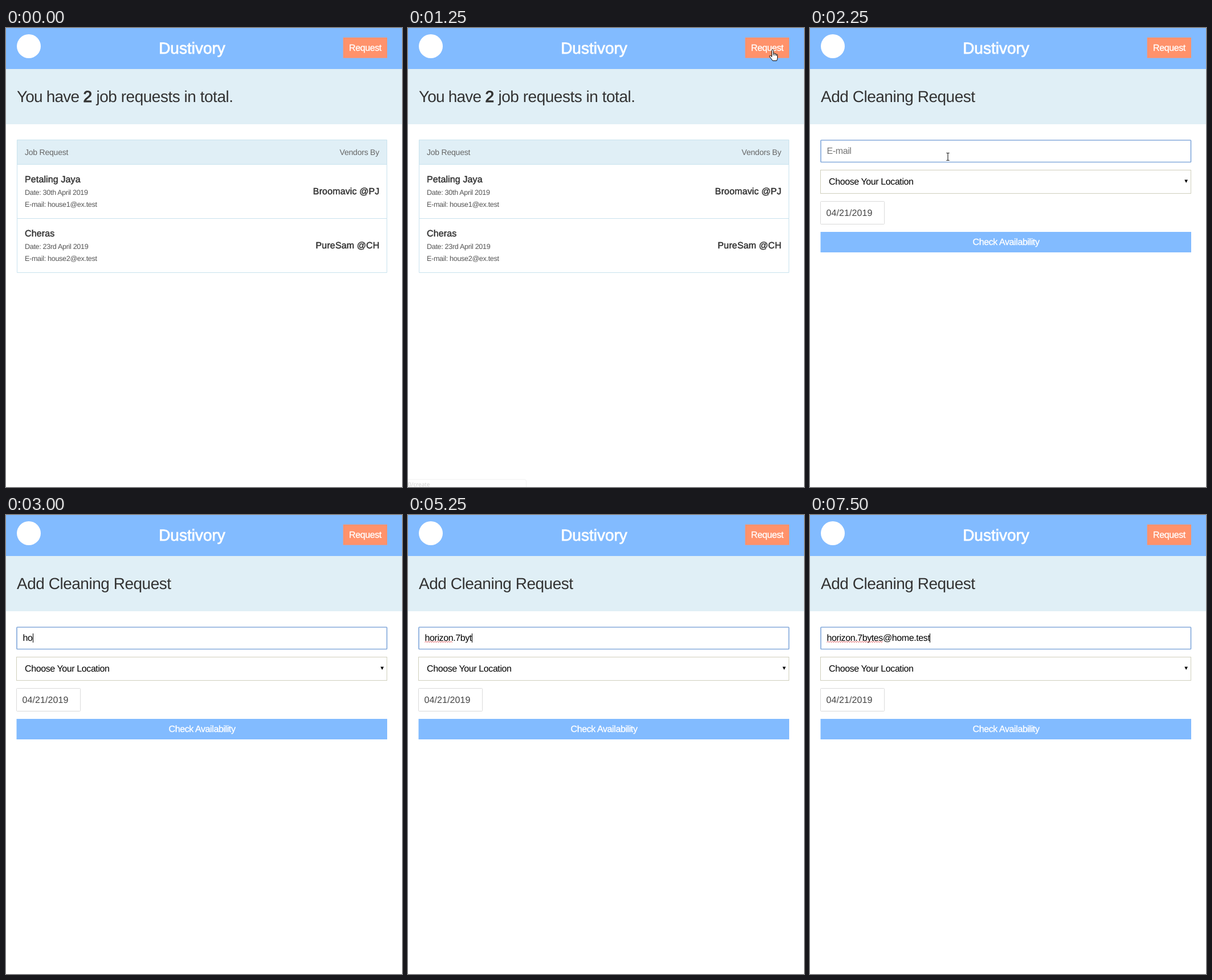
Write an HTML page that moves like this. It is 695 px wide and 806 px high and loops after 8000 ms.

```html
<!DOCTYPE html>
<html lang="en">
<head>
<meta charset="utf-8">
<title>Cleaning requests</title>
<style>
  html, body { margin: 0; width: 100%; height: 100%; overflow: hidden; background: #fff; }
  svg { display: block; width: 695px; height: 806px; }
  text { font: 16px "Liberation Sans", Arial, sans-serif; letter-spacing: -.4px; fill: #333;
         text-rendering: geometricPrecision; white-space: pre; }
  .title { font-size: 28px; letter-spacing: -.48px; }
  .strong { letter-spacing: .13px; stroke: #333; stroke-width: .5px; }
  .small { font-size: 12.6px; letter-spacing: -.33px; fill: #555; }
  .head { font-size: 14px; letter-spacing: -.22px; fill: #666; }
  .white { fill: #fff; stroke: #fff; stroke-width: .35px; }
  .brand { font-size: 28px; letter-spacing: 0; stroke-width: .8px; }
  .black { fill: #000; }
  .date { letter-spacing: .1px; fill: #444; }
  .end { text-anchor: end; }
  .mid { text-anchor: middle; }
  .box { fill: none; stroke: #c8e2ee; }
  #status text { font: 10px "Open Sans", "Noto Sans", sans-serif; letter-spacing: 0; fill: #777; }
  #cursor path { fill: #fff; stroke: #000; stroke-linejoin: round; }
</style>
</head>
<body>
<svg viewBox="0 0 695 806">
  <rect width="695" height="72" fill="#82bbff"/>
  <circle cx="40" cy="32" r="21" fill="#fff"/>
  <text class="white brand mid" x="326.5" y="45">Dustivory</text>
  <rect x="591.7" y="16.7" width="77.3" height="36" fill="#ff926b"/>
  <text class="white mid" x="630.5" y="40">Request</text>
  <rect y="72" width="695" height="97" fill="#e0eff6"/>

  <g id="list">
    <text class="title" x="19" y="130"><tspan letter-spacing="-.8">You have</tspan><tspan
      x="135.5" stroke="#333" stroke-width="1.1">2</tspan><tspan x="158.5">job requests in total.</tspan></text>
    <rect x="19" y="197" width="650" height="42" fill="#e0eff6"/>
    <path class="box" d="M19.5 196.5H668.5V429.5H19.5ZM19 239.5H669M19 334.5H669"/>
    <text class="head" x="33" y="223">Job Request</text>
    <text class="head end" x="655" y="223">Vendors By</text>
    <text class="strong" x="33" y="271">Petaling Jaya</text>
    <text class="small" x="33" y="293">Date: 30th April 2019</text>
    <text class="small" x="33" y="314">E-mail: house1@ex.test</text>
    <text class="strong end" x="655.5" y="292">Broomavic @PJ</text>
    <text class="strong" x="33" y="366">Cheras</text>
    <text class="small" x="33" y="388">Date: 23rd April 2019</text>
    <text class="small" x="33" y="409">E-mail: house2@ex.test</text>
    <text class="strong end" x="655.5" y="387">PureSam @CH</text>
  </g>

  <g id="form">
    <text class="title" x="19" y="130">Add Cleaning Request</text>
    <rect x="19" y="197" width="649.5" height="38.5" rx="1" fill="#fff" stroke="#86abdc" stroke-width="1.7"/>
    <text id="hint" x="29.5" y="221" style="fill:#757575">E-mail</text>
    <text id="typed" class="black" x="29.5" y="221"></text>
    <path id="wave" fill="none" stroke="#d8383c" stroke-width=".9"/>
    <rect id="caret" y="208" width="1" height="16"/>
    <rect class="box" x="18.5" y="249.5" width="650" height="41" style="stroke:#d0cfbd"/>
    <text class="black" x="33" y="275">Choose Your Location</text>
    <path d="M657.3 266.5H663L660.2 272Z"/>
    <rect class="box" x="18.5" y="304.5" width="112" height="40" rx="1" style="stroke:#dadada"/>
    <text class="date" x="28.5" y="330">04/21/2019</text>
    <rect x="18.5" y="358" width="650.5" height="36" fill="#82bbff"/>
    <text class="white mid" x="344" y="381">Check Availability</text>
  </g>

  <g id="status">
    <path d="M-1 792.5H204Q207.5 792.5 207.5 796V807H-1Z" fill="#fff" stroke="#dcdcdc"/>
    <text x="0" y="805">0/create</text>
  </g>

  <g id="cursor">
    <path id="arrow" d="M0 0V16L4 12.5L6.5 18L9 17L6.5 11.5H11.5Z"/>
    <path id="hand" d="M0 1.5Q0 0 1.4 0T2.8 1.5V6.5Q5 5.5 5.5 7.5Q7.8 6.5 8.2 8.5Q10 8 10 10.5V14Q10 17 8.5 19.5H1.5Q0 17-2.2 14.5L-4 11.8Q-3.8 9.7-2 10.5L0 12.5ZM2.8 6.5V10M5.5 7.5V10.5M8.2 8.5V11"/>
    <path id="beam" d="M-2.5-6.5H-.8L0-6L.8-6.5H2.5M0-6V6M-2.5 6.5H-.8L0 6L.8 6.5H2.5" style="fill:none"/>
  </g>
</svg>
<script>
const LOOP = 8000, STEP = 250;
const EMAIL = "horizon.7bytes@home.test";
const $ = id => document.getElementById(id);
const show = (id, on) => $(id).style.display = on ? "" : "none";

// [time, number of characters typed]
const typing = [[0, 0], [3000, 2], [3250, 4], [3500, 5], [3750, 7], [4000, 8],
  [4500, 9], [4750, 10], [5000, 11], [5250, 12], [5500, 14], [6000, 15],
  [6500, 17], [6750, 19], [7000, 20], [7250, 22], [7500, 24]];
// [time, x, y, pointer shape]
const pointer = [[0, 0, 0, ""], [500, 681, 72, "arrow"], [750, 661, 55, "arrow"],
  [1000, 638.5, 38, "hand"], [1750, 560, 85, "arrow"], [2000, 400, 160, "arrow"],
  [2250, 242, 226, "beam"], [2750, 0, 0, ""]];
// [time, opacity of the status bar]
const fade = [[0, 0], [1250, .35], [1500, 1], [2000, .5], [2250, 0]];

const at = (keys, t) => keys.filter(k => k[0] <= t).pop();

function zigzag(width) {
  let d = "M29.5 223.5";
  for (let x = 2, up = true; x <= width; x += 2, up = !up) d += `L${29.5 + x} ${up ? 221.8 : 223.8}`;
  return d;
}

function draw(t) {
  const count = at(typing, t)[1], typed = $("typed");
  show("list", t < 1500);
  show("form", t >= 1500);
  show("hint", !count);
  typed.textContent = EMAIL.slice(0, count);

  if (t >= 1500) {
    const width = n => n ? typed.getSubStringLength(0, n) : 0;
    const marked = t < 4000 ? 0 : t < 6000 ? 7 : 14;
    $("caret").setAttribute("x", Math.round(29.5 + width(count)));
    $("wave").setAttribute("d", marked ? zigzag(width(marked)) : "");
    show("caret", t < 2000 || t >= 2500);
  }

  $("status").style.opacity = at(fade, t)[1];
  const [, x, y, shape] = at(pointer, t);
  $("cursor").setAttribute("transform", `translate(${x} ${y})`);
  for (const id of ["arrow", "hand", "beam"]) show(id, id === shape);
}

function tick() {
  const t = performance.now() % LOOP;
  draw(Math.floor(t / STEP) * STEP);
  requestAnimationFrame(tick);
}
tick();
</script>
</body>
</html>
```
